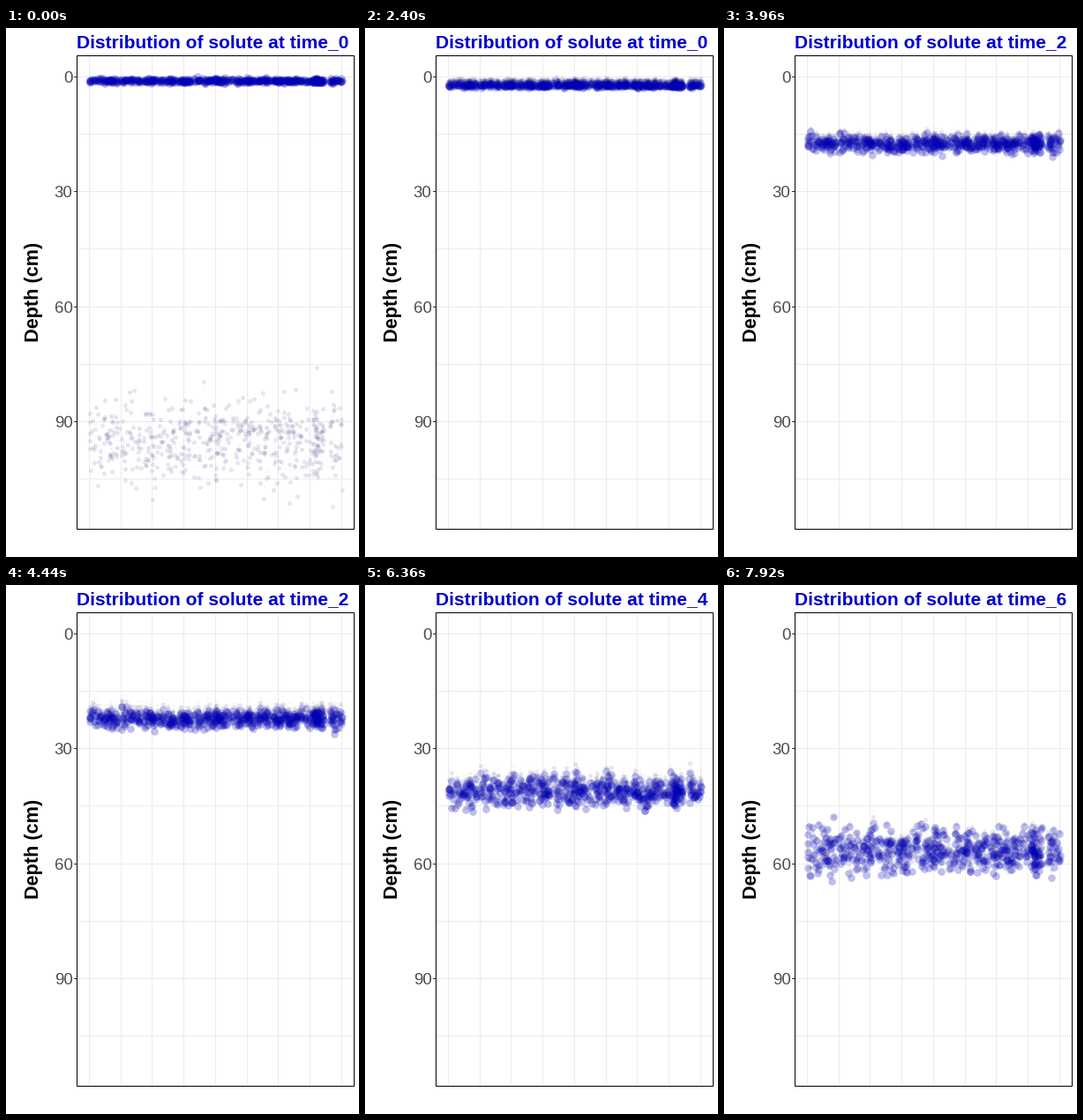
Animation, 400 px wide and 600 px high, one loop 8000 ms. Source, as a matplotlib script:

```python
import numpy as np
import matplotlib.pyplot as plt
from matplotlib.animation import FuncAnimation
from matplotlib.patches import Rectangle

W, H, DPI = 400, 600, 100
PT = 72 / DPI                       # points per pixel
LEFT, TOP, RIGHT, BOTTOM = 80.5, 31.5, 394.5, 568.5
X0, X_STEP = 94.5, 35.7
Y0, CM = 55.5, 4.344                # zero depth and pixels per cm

INTERVAL, TICKS, HOLD = 40, 200, 3  # each pose lasts HOLD ticks
CYCLE, START, PER_STATE = 100, 19, 8
STATES, COUNT = 11, 570

rng = np.random.default_rng(4)
px = rng.uniform(94, 381, COUNT)
px[(px > 360) & (px < 365)] -= 12   # small gap near the right edge
state = np.arange(STATES)
mean = 1 + 9.45 * state
spread = np.where(state == 0, 0.3, 0.5 + 0.51 * state)
depth = mean[:, None] + spread[:, None] * rng.standard_normal((STATES, COUNT))


def progress(step):
    """Position along the states, with a rest at the start."""
    return max(0, step % CYCLE - START) / PER_STATE


def dots_y(step):
    p = progress(step)
    a = min(int(p), STATES - 2)
    t = p - a
    return Y0 + CM * ((1 - t) * depth[a] + t * depth[a + 1])


fig = plt.figure(figsize=(W / DPI, H / DPI), dpi=DPI, facecolor="white")
ax = fig.add_axes([0, 0, 1, 1])
ax.set_xlim(0, W)
ax.set_ylim(H, 0)
ax.axis("off")


def line(xs, ys, color):
    ax.plot(xs, ys, color=color, lw=PT, zorder=1, snap=False,
            solid_capstyle="butt")


def label(x, y, text, size, color, **kw):
    return ax.text(x, y, text, fontsize=size * PT, color=color,
                   family="Liberation Sans", va="baseline", **kw)


def pixel_center(v):
    return np.floor(v) + 0.5


for i in range(9):
    x = pixel_center(X0 + i * X_STEP)
    line([x, x], [TOP, BOTTOM], "#ebebeb")
for d in range(0, 106, 15):
    y = pixel_center(Y0 + d * CM)
    line([LEFT, RIGHT], [y, y], "#ebebeb")
    if d % 30 == 0:
        line([77, 80], [y, y], "#333333")
        label(75.5, y + 6.7, str(d), 18.67, "#4d4d4d", ha="right")

ax.add_patch(Rectangle((LEFT, TOP), RIGHT - LEFT, BOTTOM - TOP, fill=False,
                       ec="black", lw=PT, zorder=5, snap=False))
label(36.5, 356, "Depth (cm)", 21.6, "black", weight="bold", rotation=90,
      rotation_mode="anchor", ha="left")
title = label(80, 22, "", 21.05, "#0000cd", weight="bold", ha="left")


def dots(size, color, alpha, z):
    return ax.plot(px, px, "o", ms=size * PT, mew=0, color=color,
                   alpha=alpha, zorder=z)[0]


# newest first: the dots, then their fading wake
layers = [dots(8.6, "#0000b4", 0.25, 4),
          dots(5, "#1a0a70", 0.10, 3),
          dots(2.4, "#1a0a70", 0.03, 2)]


def update(tick):
    step = tick // HOLD
    for age, layer in enumerate(layers):
        layer.set_ydata(dots_y(step - age))
    nearest = int(np.ceil(progress(step) - 0.5))
    title.set_text(f"Distribution of solute at time_{nearest}")
    return [*layers, title]


anim = FuncAnimation(fig, update, frames=TICKS, interval=INTERVAL,
                     repeat=True, repeat_delay=0, blit=False)
plt.show()
```
